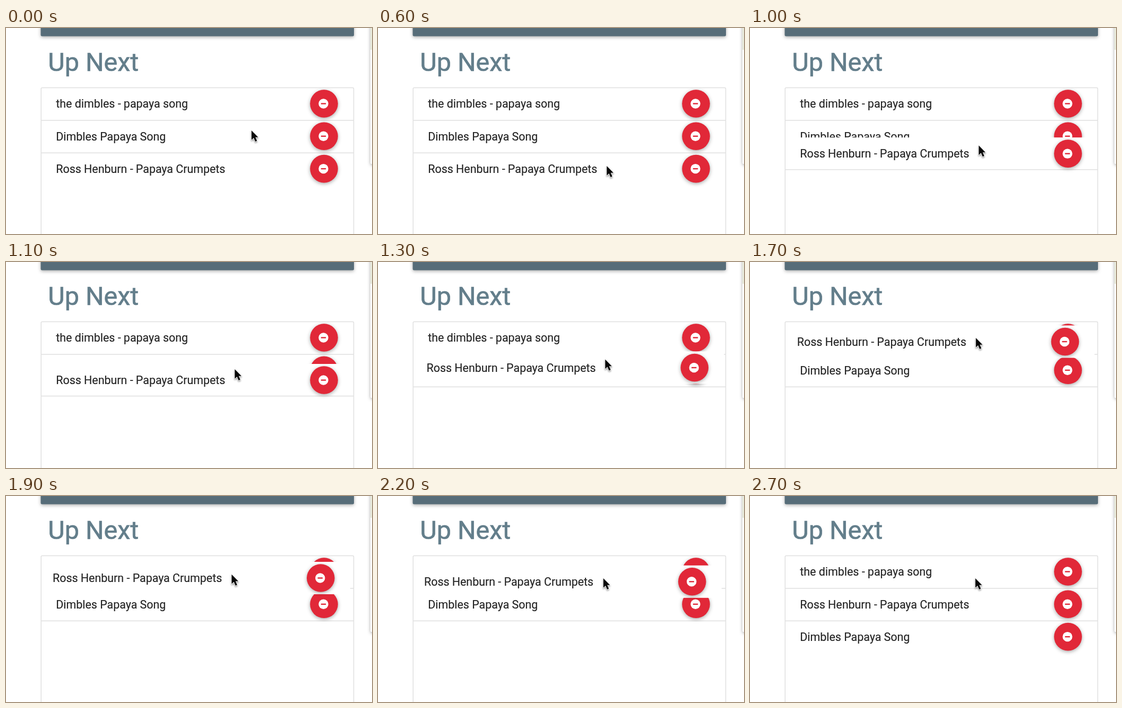
Animation of 690x388 px, one loop 2.8 s. Source, as an HTML page:

```html
<!DOCTYPE html>
<html lang="en">
<head>
<meta charset="utf-8">
<title>Playlist reorder</title>
<style>
  html, body { margin: 0; width: 100%; height: 100%; overflow: hidden; background: #fff; }
  svg { display: block; width: 100%; height: 100%; }
  text { font-family: Roboto, sans-serif; font-size: 21.4px; fill: #252525; stroke: #252525; stroke-width: .2; }
  .heading { font-size: 48.5px; fill: #637e8b; stroke: #637e8b; stroke-width: .7; }
  .line { fill: none; stroke: #e0e0e0; stroke-width: 1.5; }
  .bar { fill: #576d79; filter: drop-shadow(0 2px 3px rgba(0, 0, 0, .32)); }
  .card { fill: #fff; filter: drop-shadow(0 2px 3px rgba(0, 0, 0, .32)); }
  .disc { fill: #e12838; filter: drop-shadow(0 2px 3.5px rgba(0, 0, 0, .34)); }
  .pointer { fill: #080808; stroke: #fff; stroke-width: 1.6; stroke-linejoin: round;
    paint-order: stroke; filter: drop-shadow(0 2px 1.5px rgba(0, 0, 0, .4)); }
</style>
</head>
<body>
<svg viewBox="0 0 690 388" preserveAspectRatio="none">
  <defs>
    <g id="remove">
      <circle class="disc" cx="599.5" r="26.3"/>
      <circle cx="598.5" r="9.2" fill="#fff"/>
      <rect x="593.8" y="-1.2" width="9.4" height="2.4" fill="#e12838"/>
    </g>
  </defs>

  <rect class="bar" x="65.5" y="-10" width="590.5" height="25.5" rx="2.5"/>
  <rect class="card" x="687" y="-10" width="20" height="266" rx="2"/>
  <rect x="687" width="3" height="41" fill="#e9ebdc"/>
  <text class="heading" x="79.2" y="81">Up Next</text>

  <path class="line" d="M67 174H655M67 235.3H655"/>
  <g id="first">
    <text x="94.3" y="7.7">the dimbles - papaya song</text>
    <use href="#remove"/>
  </g>
  <g id="second">
    <text x="94.3" y="7.7">Dimbles Papaya Song</text>
    <use href="#remove"/>
  </g>
  <g id="dragged">
    <rect id="cover" x="67" y="-30.5" width="588" height="61" fill="#fff"/>
    <path id="edge" class="line" d="M67 30H655"/>
    <text x="94.3" y="7.7">Ross Henburn - Papaya Crumpets</text>
    <use href="#remove"/>
  </g>
  <rect class="line" x="66.2" y="112.6" width="589.3" height="300" rx="2"/>

  <path id="pointer" class="pointer" d="M.8 2V19.8L5 16L8 23L11.2 21.6L8.2 14.8H13.4Z"/>
</svg>

<script>
  const STEP = 100, STEPS = 28;
  const LIFT = 9, DROP = 23;
  const slotY = slot => 142.5 + 61.3 * slot;

  // Key poses [step, x, y], joined by straight moves
  const pointerKeys = [
    [2, 462, 191], [6, 430.5, 258], [8, 430.5, 258], [11, 430.5, 200],
    [15, 424.5, 163], [17, 425, 141], [22, 424, 153]
  ];
  const dragKeys = [
    [8, 0, 265], [11, 0, 222.5], [15, -5.5, 175.5], [17, -5.5, 150], [22, -7.3, 161.3]
  ];

  const el = id => document.getElementById(id);
  const place = (id, x, y) => el(id).setAttribute('transform', `translate(${x} ${y})`);
  const show = (id, visible) => el(id).setAttribute('visibility', visible ? 'visible' : 'hidden');

  function poseAt(keys, step) {
    const next = keys.findIndex(key => key[0] > step);
    if (next < 0) return keys.at(-1).slice(1);
    const [t0, x0, y0] = keys[Math.max(next - 1, 0)];
    const [t1, x1, y1] = keys[next];
    const k = Math.max(0, (step - t0) / (t1 - t0 || 1));
    return [x0 + (x1 - x0) * k, y0 + (y1 - y0) * k];
  }

  function draw(step) {
    const dropped = step >= DROP;
    const dragging = step >= LIFT && !dropped;
    const [x, y] = dragging ? poseAt(dragKeys, step) : [0, slotY(dropped ? 1 : 2)];
    place('first', 0, slotY(0));
    place('second', 0, slotY(dropped ? 2 : 1));
    place('dragged', x, y);
    place('pointer', ...poseAt(pointerKeys, step));
    show('cover', dragging);
    show('edge', dragging && y + 30 > 236);
  }

  const start = performance.now();
  function tick() {
    draw(Math.floor((performance.now() - start) / STEP) % STEPS);
    requestAnimationFrame(tick);
  }
  tick();
</script>
</body>
</html>
```
